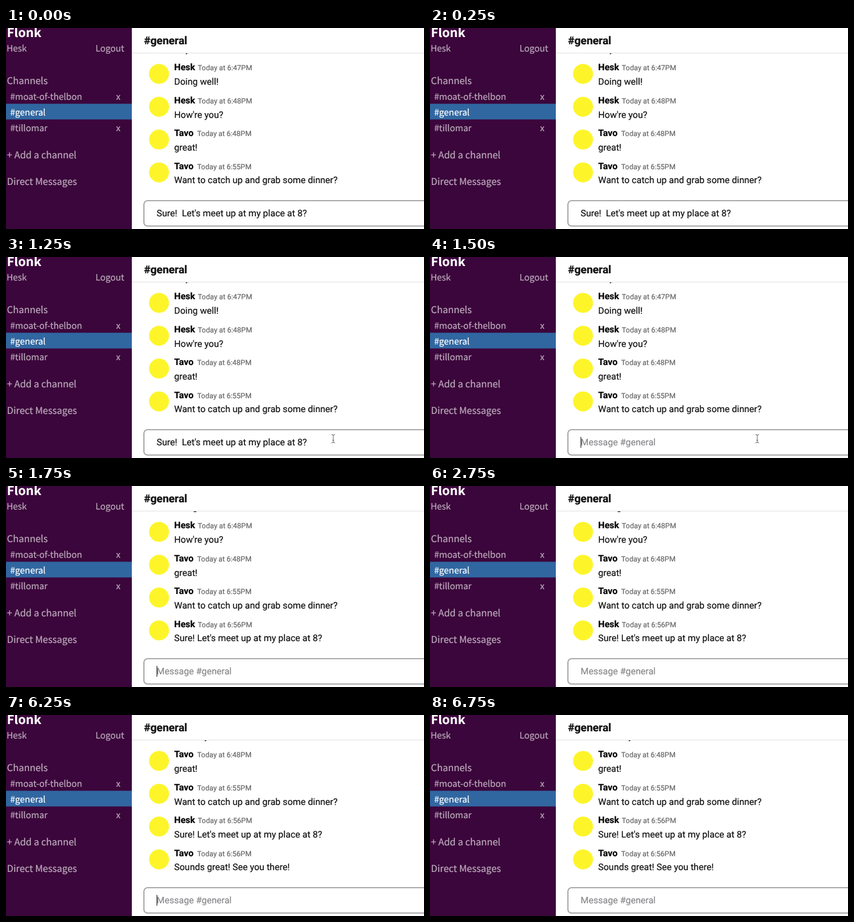
An HTML page that plays this animation: 691 by 333 pixels, repeating every 7 s.

```html
<!DOCTYPE html>
<html lang="en">
<head>
<meta charset="utf-8">
<title>Chat</title>
<style>
  html, body { margin: 0; width: 100%; height: 100%; overflow: hidden; background: #fff; }
  svg { display: block; width: 691px; height: 333px; }
  text { white-space: pre; font: 15.1px Roboto, sans-serif; fill: #111; stroke: #111; stroke-width: .2px; text-rendering: geometricPrecision; }
  .side text { font: 14.5px "Noto Sans CJK SC", "Noto Sans CJK JP", "Noto Sans CJK", sans-serif; fill: #bdabbd; stroke: #bdabbd; }
  .side .head { font-size: 15.6px; }
  .side .brand { font-size: 20.5px; font-weight: 700; fill: #fff; stroke: #fff; }
  .side .on { fill: #fff; stroke: #fff; }
  .title { font-size: 18.1px; font-weight: 700; }
  .name { font-weight: 700; fill: #000; }
  .time { font-size: 12px; fill: #666668; stroke: #666668; }
  .hint { fill: #88888c; stroke: #88888c; }
</style>
</head>
<body>
<svg id="stage" viewBox="0 0 691 333" xmlns="http://www.w3.org/2000/svg">
  <rect width="691" height="333" fill="#fff"/>
  <g id="log"></g>
  <rect x="208" width="483" height="41" fill="#fff"/>
  <rect x="208" y="41" width="483" height="1" fill="#e2e2e4"/>
  <text class="title" x="228" y="27">#general</text>

  <rect x="228" y="286.2" width="500" height="42" rx="6" fill="#fff" stroke="#a0a0a4" stroke-width="1.8"/>
  <text id="draft" x="249" y="312">Sure!  Let's meet up at my place at 8?</text>
  <text id="hint" class="hint" x="249" y="312">Message #general</text>
  <rect id="caret" y="298" width="1" height="18" fill="#111"/>
  <path id="beam" d="M-3-7q3 0 3 2q0-2 3-2M0-5V5M-3 7q3 0 3-2q0 2 3 2M-1.5 2.5h3" fill="none" stroke="#666"/>

  <g class="side" id="side">
    <rect width="208" height="333" fill="#3b063b"/>
    <rect y="125.5" width="208" height="26" fill="#3167a1"/>
  </g>
</svg>
<script>
const $ = id => document.getElementById(id);
const NS = 'http://www.w3.org/2000/svg';
const LOOP = 7000, PITCH = 54.4;

function add(parent, tag, attrs, text = '') {
  const el = document.createElementNS(NS, tag);
  for (const key in attrs) el.setAttribute(key, attrs[key]);
  el.textContent = text;
  parent.append(el);
  return el;
}

const labels = [
  [1.5, 15, 'Flonk', 'brand'], [1, 39, 'Hesk'], [148, 39, 'Logout'],
  [1.5, 93, 'Channels', 'head'],
  [7, 119, '#moat-of-thelbon'], [182, 119, 'x'],
  [7, 145, '#general', 'on'],
  [7, 171, '#tillomar'], [182, 171, 'x'],
  [1.5, 216, '+ Add a channel', 'head'], [1.5, 260, 'Direct Messages', 'head']
];
for (const [x, y, text, cls = ''] of labels) add($('side'), 'text', { x, y, class: cls }, text);

const messages = [
  ['Tavo', '6:47', 'Hey'],
  ['Hesk', '6:47', 'Doing well!'],
  ['Hesk', '6:48', "How're you?"],
  ['Tavo', '6:48', 'great!'],
  ['Tavo', '6:55', 'Want to catch up and grab some dinner?'],
  ['Hesk', '6:56', "Sure! Let's meet up at my place at 8?"],
  ['Tavo', '6:56', 'Sounds great! See you there!']
];
const rows = messages.map(([name, time, body], i) => {
  const row = add($('log'), 'g', { transform: `translate(0 ${(i - 1) * PITCH})` });
  add(row, 'circle', { cx: 253, cy: 76, r: 16.5, fill: '#fdf52a' });
  add(row, 'text', { x: 278, y: 70.4, class: 'name' }, name);
  add(row, 'text', { x: name === 'Hesk' ? 317 : 316, y: 70.4, class: 'time' }, `Today at ${time}PM`);
  add(row, 'text', { x: 278, y: 94.3 }, body);
  return row;
});

// [start ms, messages scrolled, draft shown, caret x, pointer x]; 0 hides
const steps = [
  [0, 0, 1, 0, 0],
  [500, 0, 1, 0, 540],
  [750, 0, 1, 497, 541],
  [1250, 0, 1, 0, 541],
  [1500, 0, 0, 249, 541],
  [1750, 1, 0, 249, 0],
  [2000, 1, 0, 0, 0],
  [2500, 1, 0, 249, 0],
  [2750, 1, 0, 0, 0],
  [4500, 2, 0, 0, 0],
  [6250, 2, 0, 249, 0],
  [6750, 2, 0, 0, 0]
];

const show = (el, on) => el.setAttribute('visibility', on ? 'visible' : 'hidden');

function draw(now) {
  const t = now % LOOP;
  const [, scroll, draft, caret, pointer] = steps.findLast(s => s[0] <= t);
  $('log').setAttribute('transform', `translate(0 ${-scroll * PITCH})`);
  rows.forEach((row, i) => show(row, i >= scroll && i <= scroll + 4));
  show($('draft'), draft);
  show($('hint'), !draft);
  show($('caret'), caret);
  $('caret').setAttribute('x', caret);
  show($('beam'), pointer);
  $('beam').setAttribute('transform', `translate(${pointer} 301)`);
}

const start = performance.now();
function tick() {
  draw(performance.now() - start);
  requestAnimationFrame(tick);
}
tick();
</script>
</body>
</html>
```
